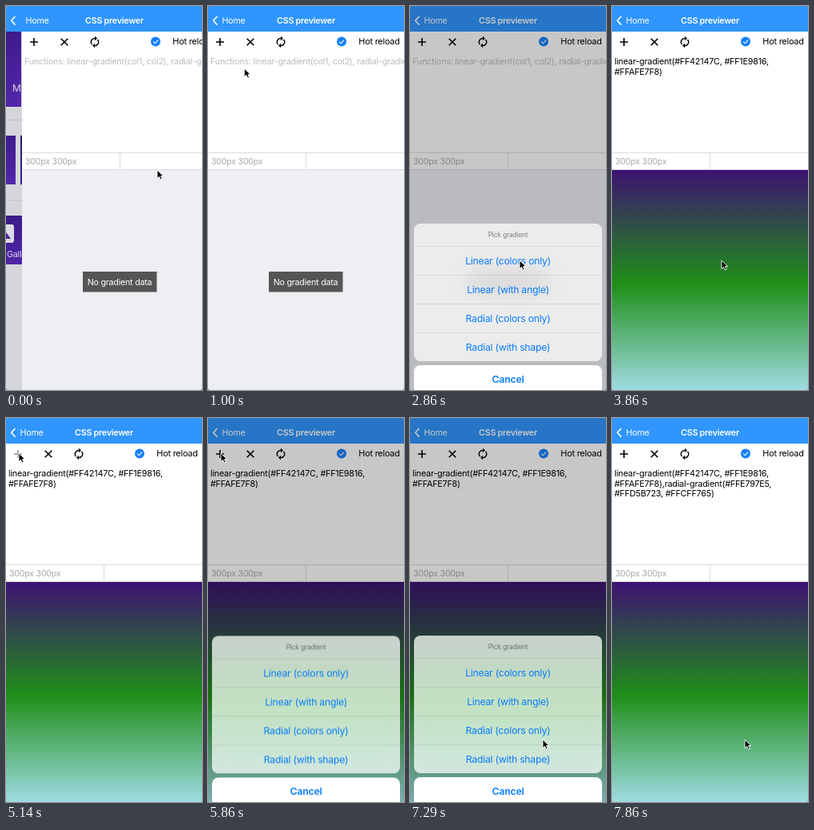
Recreate the animation shown at these times as an HTML page. Size 245 by 480 pixels, loop 8000 ms.

```html
<!DOCTYPE html>
<html lang="en">
<head>
<meta charset="utf-8">
<title>Gradient previewer</title>
<style>
  html, body { margin: 0; width: 100%; height: 100%; overflow: hidden; background: #444; }
  #stage {
    position: relative; width: 245px; height: 480px; overflow: hidden; border-radius: 3px;
    background: #eeeff3; font-family: Inter, "Liberation Sans", sans-serif; letter-spacing: -.014em;
  }
  #stage > * { position: absolute; left: 0; top: 0; }
  svg { display: block; overflow: hidden; }
  text { white-space: pre; }
  #dim { width: 245px; height: 480px; background: #000; }
  #sheet { left: 5px; top: 272px; width: 235px; height: 220px; color: #0a7cf8; font-size: 12.2px; text-align: center; }
  .card { border-radius: 8px; overflow: hidden; }
  .menu {
    height: 172px; background: rgba(250, 250, 250, .78);
    -webkit-backdrop-filter: blur(14px) saturate(1.8); backdrop-filter: blur(14px) saturate(1.8);
  }
  .menu div, .cancel { height: 36px; line-height: 35px; box-sizing: border-box; }
  .menu div { border-top: .6px solid rgba(60, 60, 67, .1); }
  .menu .head { height: 28px; line-height: 28px; border: 0; font-size: 8.5px; color: rgba(0, 0, 0, .46); }
  .cancel { margin-top: 5px; line-height: 36px; background: #fff; font-weight: 600; font-size: 12.3px; }
</style>
</head>
<body>
<div id="stage">
  <svg width="245" height="480" viewBox="0 0 245 480" font-size="10.7">
    <defs>
      <linearGradient id="result" gradientUnits="userSpaceOnUse" x1="0" y1="204.5" x2="0" y2="490">
        <stop offset="0" stop-color="#3e1273"/>
        <stop offset=".5" stop-color="#1f8f18"/>
        <stop offset="1" stop-color="#a8e1f1"/>
      </linearGradient>
      <linearGradient id="tile" x1="0" y1="0" x2="1" y2="1">
        <stop offset="0" stop-color="#2c1271"/>
        <stop offset="1" stop-color="#5527ae"/>
      </linearGradient>
    </defs>

    <g id="home">
      <rect x="-20" y="32" width="60" height="448" fill="#d5d6da"/>
      <path d="M-20 142.500H40M-20 243H40" stroke="#bfc0c4"/>
      <g fill="url(#tile)">
        <rect x="-60" y="32" width="79" height="94"/>
        <rect x="-60" y="162" width="72" height="61"/>
        <rect x="18" y="162" width="72" height="61"/>
        <rect x="-60" y="262" width="90" height="61"/>
      </g>
      <rect x="-14" y="273" width="24" height="23" rx="3" fill="#dcdce4"/>
      <path d="M-10 291L-2 280L6 291Z" fill="#4a2299"/>
      <g fill="#dcdce4">
        <text x="8" y="107" font-size="12">Main</text>
        <text x="1" y="314">Gallery</text>
      </g>
    </g>

    <g id="page">
      <rect y="32" width="245" height="448" fill="#eeeff3"/>
      <rect y="32" width="245" height="172" fill="#fff"/>
      <g fill="none" stroke="#000" stroke-width="1.6">
        <path id="plus" d="M10 45H20M15 40V50"/>
        <path d="M48.700 40.700L57.300 49.300M57.300 40.700L48.700 49.300"/>
        <path d="M87.500 48A4.500 4.500 0 0 1 91.500 40.500M94.500 42A4.500 4.500 0 0 1 90.500 49.500" stroke-width="1.4"/>
      </g>
      <path d="M91 37.800L94 40.500L91 43.200ZM91 46.800L88 49.500L91 52.200Z"/>
      <circle cx="167" cy="44.500" r="6" fill="#1680fb"/>
      <path d="M164 44.700L166.200 46.800L170 42.600" fill="none" stroke="#fff" stroke-width="1.1"/>
      <text x="188.300" y="48" font-size="10.900">Hot reload</text>
      <text id="hint" x="3" y="73" font-size="10.8" fill="#bdbdc0">Functions: linear-gradient(col1, col2), radial-gradient(col1, col2)</text>
      <g id="code" font-size="10.8">
        <text x="3" y="73">linear-gradient(#FF42147C, #FF1E9816,</text>
        <text x="3" y="85.700" id="line2"></text>
        <text x="3" y="98.400" id="line3">#FFD5B723, #FFCFF765)</text>
      </g>
      <path d="M0 183.500H245M0 204.500H245M122.500 183.500V204.500" stroke="#dcdcdf"/>
      <text x="4" y="198" font-size="10.600" fill="#a9a9ad">300px 300px</text>
      <g id="toast">
        <rect x="76" y="332" width="92.500" height="25.500" fill="#555"/>
        <text x="122" y="348.800" text-anchor="middle" fill="#fff">No gradient data</text>
      </g>
      <rect id="fill" y="205" width="245" height="275" fill="url(#result)"/>
    </g>

    <rect width="245" height="32" fill="#3096fd"/>
    <path d="M11.500 13L6.700 18.300L11.500 23.600" fill="none" stroke="#fff" stroke-width="1.600"/>
    <text id="back" x="17.500" y="22" fill="#fff">Home</text>
    <text id="title" x="122.500" y="22" fill="#fff" font-weight="600" text-anchor="middle">CSS previewer</text>
  </svg>

  <div id="dim"></div>
  <div id="sheet">
    <div class="card menu">
      <div class="head">Pick gradient</div>
      <div>Linear (colors only)</div>
      <div>Linear (with angle)</div>
      <div>Radial (colors only)</div>
      <div>Radial (with shape)</div>
    </div>
    <div class="card cancel">Cancel</div>
  </div>
  <svg id="pointer" width="12" height="16" viewBox="-1 -1 12 16">
    <path d="M0 0V10.500L2.500 8.300L4.200 12L6.100 11.200L4.500 7.600H7.800Z" stroke="#fff" stroke-width=".9"/>
  </svg>
</div>
<script>
const LOOP = 8000;
const $ = id => document.getElementById(id);
const clamp = v => Math.min(1, Math.max(0, v));
const smooth = v => v * v * (3 - 2 * v);
const show = (id, on) => { $(id).style.visibility = on ? "visible" : "hidden"; };
const shift = (id, x) => $(id).setAttribute("transform", `translate(${x} 0)`);

// Pointer stops: time, x, y
const path = [
  [0, 189, 205], [280, 189, 205], [1250, 17, 53], [2143, 17, 53],
  [2857, 137, 318], [4250, 137, 318], [5100, 16, 44], [5890, 16, 44],
  [6857, 145, 391], [7143, 166, 402]
];
// Sheet visits: first seen, dismissed
const visits = [[1714, 3286], [5571, 7286]];
const LEAVE = 428;
const [firstDone, secondDone] = visits.map(v => v[1] + LEAVE);

function pointerAt(t) {
  const i = path.findIndex(p => p[0] > t);
  if (i < 0) return path[path.length - 1].slice(1);
  const [a, b] = [path[i - 1], path[i]];
  const f = smooth((t - a[0]) / (b[0] - a[0]));
  return [a[1] + (b[1] - a[1]) * f, a[2] + (b[2] - a[2]) * f];
}

function draw(ms) {
  // The screen refreshes seven times a second
  const t = Math.floor((ms + 5) * .007) / .007;

  const off = t < 500 ? 20 * Math.exp(-t / 100) : 0;
  shift("page", off);
  shift("home", (off - 20) * .3);
  shift("back", off * .35);
  shift("title", off * .65);

  // The plus fades while pressed, shortly before its sheet opens
  const pressed = visits.some(([open]) => t > open - 450 && t < open - 300);
  $("plus").style.opacity = pressed ? .4 : 1;

  const visit = visits.find(v => t >= v[0] - 1 && t < v[1] + LEAVE);
  show("sheet", visit);
  show("dim", visit);
  if (visit) {
    const leave = clamp((t - visit[1]) / LEAVE);
    const y = 9.5 * Math.exp((visit[0] - t) / 90) + 215 * smooth(leave);
    $("sheet").style.transform = `translateY(${y}px)`;
    $("dim").style.opacity = .22 * (1 - leave);
  }

  const first = t >= firstDone, second = t >= secondDone;
  show("hint", !first);
  show("toast", !first);
  show("code", first);
  show("fill", first);
  show("line3", second);
  $("line2").textContent = "#FFAFE7F8)" + (second ? ",radial-gradient(#FFE797E5," : "");

  const [x, y] = pointerAt(t);
  $("pointer").style.transform = `translate(${x - 1}px, ${y - 1}px)`;
}

const start = performance.now();
function tick() {
  draw((performance.now() - start) % LOOP);
  requestAnimationFrame(tick);
}
tick();
</script>
</body>
</html>
```
